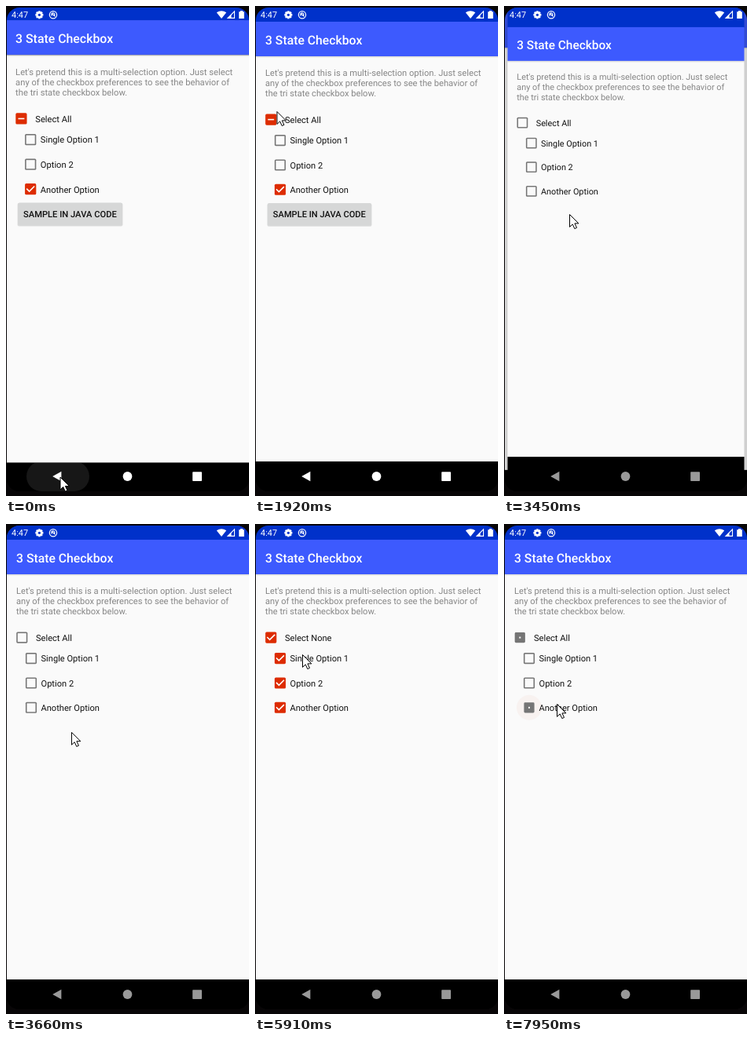
An HTML page with a canvas for the animation above (8 s loop, 309x624 px).

```html
<!DOCTYPE html>
<html lang="en">
<head>
<meta charset="utf-8">
<title>3 State Checkbox</title>
<style>
html, body { margin: 0; width: 100%; height: 100%; overflow: hidden; background: #080607; }
canvas { display: block; width: 309px; height: 624px; }
</style>
</head>
<body>
<canvas></canvas>
<script>
const LOOP = 8000, W = 309, H = 624;
const RED = '#dd2c00', GRAY = '#757575';
const OFF = 0, ON = 1, MIXED = 2;
const PRESS_LEAD = 85;

const canvas = document.querySelector('canvas');
const c = canvas.getContext('2d');
const dpr = window.devicePixelRatio || 1;
canvas.width = W * dpr;
canvas.height = H * dpr;
c.textRendering = 'geometricPrecision';

const clamp = v => Math.max(0, Math.min(1, v));
const ramp = (t, from, to) => clamp((t - from) / (to - from));
const smooth = u => u * u * (3 - 2 * u);

// Each pointer move eases from wherever the last one ended.
const HOME = { x: 69, y: 599.5 };
const MOVES = [
  { from: 0, to: 880, x: 77, y: 260.5 },
  { from: 1020, to: 1850, x: 28, y: 134 },
  { from: 2130, to: 2760, x: 83.5, y: 265 },
  { from: 3640, to: 4490, x: 60.5, y: 154 },
  { from: 5840, to: 5910, x: 60.5, y: 166 },
  { from: 6400, to: 6710, x: 60.5, y: 197 },
  { from: 7250, to: 7600, x: 67.5, y: 229 }
];

const OPTIONS = ['Single Option 1', 'Option 2', 'Another Option'];
const ROWS = [
  { x: 20.3, y: 144.6, label: 38 },
  ...OPTIONS.map((text, i) => ({ x: 32, y: 171.1 + 31.35 * i, label: 44.5, text }))
];
const SCREENS = [
  makeScreen([OFF, OFF, ON], [{ t: 2000, row: 0 }]),
  makeScreen([OFF, OFF, OFF], [5090, 6140, 6930, 7745].map((t, row) => ({ t, row })))
];

// Plays the taps through and records every row's state changes.
function makeScreen(options, taps) {
  const summary = () => options.every(v => v === options[0]) ? options[0] : MIXED;
  const history = [summary(), ...options].map(state => [{ t: 0, state }]);
  for (const { t, row } of taps) {
    if (row) options[row - 1] = 1 - options[row - 1];
    else options.fill(summary() === ON ? OFF : ON);
    [summary(), ...options].forEach((state, i) => {
      if (state !== history[i].at(-1).state) history[i].push({ t, state });
    });
  }
  return { taps, history };
}

function stateAt(changes, t) {
  const past = changes.filter(change => change.t <= t);
  const last = past.at(-1);
  const before = past.length > 1 ? past.at(-2).state : last.state;
  return { now: last.state, before, u: past.length > 1 ? ramp(t, last.t, last.t + 500) : 1 };
}

function pointerAt(t) {
  return MOVES.reduce((p, move) => {
    const u = smooth(ramp(t, move.from, move.to));
    return { x: p.x + (move.x - p.x) * u, y: p.y + (move.y - p.y) * u };
  }, HOME);
}

function rect(x, y, w, h, color) {
  c.fillStyle = color;
  c.fillRect(x, y, w, h);
}

function round(x, y, w, h, r, color) {
  c.fillStyle = color;
  c.beginPath();
  c.roundRect(x, y, w, h, r);
  c.fill();
}

function disc(x, y, r, color) {
  round(x - r, y - r, 2 * r, 2 * r, r, color);
}

function shape(d, fill, stroke, width) {
  const path = new Path2D(d);
  if (fill) { c.fillStyle = fill; c.fill(path); }
  if (stroke) { c.strokeStyle = stroke; c.lineWidth = width; c.stroke(path); }
}

function text(s, x, y, size, color, weight = 400) {
  c.font = `${weight} ${size}px Roboto, sans-serif`;
  c.fillStyle = color;
  c.fillText(s, x, y);
}

function scaled(s, x, y, draw) {
  c.save();
  c.translate(x, y);
  c.scale(s, s);
  draw();
  c.restore();
}

function clipped(x, y, w, h, r, draw) {
  c.save();
  c.beginPath();
  c.roundRect(x, y, w, h, r);
  c.clip();
  draw();
  c.restore();
}

function glyph(state, size) {
  if (size <= 0) return;
  scaled(size, 0, 0, () => {
    if (state === ON) shape('M-6.3-.7L-2 3.6 6.3-4.7', null, '#fff', 2);
    else if (state === MIXED) rect(-5, -1, 10, 2, '#fff');
    else rect(-7, -7, 14, 14, '#fafafa');
  });
}

// The old mark collapses to the centre, then the new one grows from it.
function checkbox(row, { now, before, u }) {
  scaled(.785 * (1 - .07 * Math.sin(Math.PI * u)), row.x, row.y, () => {
    round(-9, -9, 18, 18, 2, now === OFF ? GRAY : RED);
    glyph(before, u < 1 ? 1 - ramp(u, 0, .32) : 0);
    glyph(now, ramp(u, .33, .75));
  });
}

function press({ t: tap, row }, t) {
  const dt = t - tap + PRESS_LEAD;
  const alpha = .12 * Math.min(ramp(dt, 0, 70), 1 - ramp(dt, 150, 360));
  if (alpha > 0) disc(ROWS[row].x, ROWS[row].y, 8 + 8 * ramp(dt, 0, 120), `rgba(200,50,20,${alpha})`);
}

function button(t) {
  round(15.5, 251.5, 133, 29.3, 2, 'rgba(0,0,0,.12)');
  round(16, 251, 132, 28.7, 2, '#d6d7d7');
  const u = ramp(t, 2950, 3240);
  if (u > 0) clipped(16, 251, 132, 28.7, 2, () => disc(83.5, 265, 10 + 65 * u, 'rgba(0,0,0,.12)'));
  text('SAMPLE IN JAVA CODE', 22.8, 269.3, 11.1, '#111', 500);
}

function screen(index, t) {
  const { taps, history } = SCREENS[index];
  rect(1, -12, 308, 32.5, '#0031ca');
  rect(1, 20, 308, 44, '#3d5afe');
  rect(1, 64, 308, 516, '#fafafa');
  rect(1, 64, 308, 1, 'rgba(0,0,0,.12)');
  rect(1, 65, 308, 1, 'rgba(0,0,0,.05)');
  rect(1, 580, 308, 44, '#000');
  text('3 State Checkbox', 13, 48.6, 15.75, '#fff', 500);
  [
    "Let's pretend this is a multi-selection option. Just select",
    'any of the checkbox preferences to see the behavior of',
    'the tri state checkbox below.'
  ].forEach((line, i) => text(line, 13, 89 + 13 * i, 11.15, '#868686'));

  taps.forEach(tap => press(tap, t));
  ROWS.forEach((row, i) => {
    const state = stateAt(history[i], t);
    checkbox(row, state);
    const label = row.text || (state.now === ON ? 'Select None' : 'Select All');
    text(label, row.label, row.y + 4.3, 11.1, '#111');
  });
  if (index === 0) button(t);
}

function statusIcons() {
  text('4:47', 7, 15.4, 11, '#fff');
  for (let i = 0; i < 8; i++) {
    c.save();
    c.translate(42.4, 11.3);
    c.rotate(i * Math.PI / 4);
    rect(-1.3, -5, 2.6, 3, '#fff');
    c.restore();
  }
  disc(42.4, 11.3, 4, '#fff');
  disc(42.4, 11.3, 1.6, '#0031ca');
  disc(60, 11.3, 5.2, '#fff');
  disc(60, 11.3, 4, '#0031ca');
  shape('M57.7 9.3L62.5 13.4M58.5 12.5A2 2 0 1 1 61.6 12', null, '#fff', 1.2);
  shape('M267.8 8.3Q274 4 280.2 8.3L274 16Z', '#fff');
  shape('M282 15.4L290.5 6.8V15.4Z', null, '#fff', 1.1);
  shape('M282 15.4L286.5 10.8V15.4Z', '#fff');
  shape('M296.2 7.2H298V5.9H301V7.2H302.8V16H296.2Z', '#fff');
}

function navigation(t) {
  const glow = 1 - ramp(t, 70, 450);
  if (glow > 0) {
    clipped(1, 582, 308, 36, 0, () => round(26, 580, 80, 38, 19, `rgba(255,255,255,${.09 * glow})`));
  }
  const level = Math.round(255 - 59 * ramp(t, 2350, 2690) - 43 * ramp(t, 2920, 3240));
  const color = `rgb(${level},${level},${level})`;
  shape('M59.2 599L70.4 592.8V605.2Z', color);
  disc(154.5, 599, 5.9, color);
  round(237.2, 593.2, 11.8, 11.8, .8, color);
}

function zoomed(index, t, s) {
  scaled(s, 155, 322, () => {
    c.translate(-155, -322);
    screen(index, t);
  });
}

function display(t) {
  rect(0, 0, W, H, '#000');
  const open = 1 - (1 - ramp(t, 3345, 3740)) ** 6;
  if (open < 1) {
    zoomed(0, t, 1 + .0065 * (1 - ramp(t, 0, 70)) + .05 * open);
    rect(0, 0, W, H, `rgba(0,0,0,${.2 * open})`);
  }
  if (open > 0) {
    c.globalAlpha = ramp(t, 3345, 3420);
    zoomed(1, t, .85 + .15 * open);
    c.globalAlpha = 1;
  }
  statusIcons();
  navigation(t);
}

function draw(t) {
  c.setTransform(dpr, 0, 0, dpr, 0, 0);
  rect(0, 0, W, H, '#080607');
  clipped(1, 2, 308, 616, 16, () => display(t));

  const { x, y } = pointerAt(t);
  c.save();
  c.translate(x, y);
  shape('M0 .5V16.4L3.7 12.9 6.3 18.6 9 17.4 6.4 11.9H11.4Z', '#fff', '#000', 1);
  c.restore();
}

const start = performance.now();
function tick() {
  draw((performance.now() - start) % LOOP);
  requestAnimationFrame(tick);
}
tick();
</script>
</body>
</html>
```
